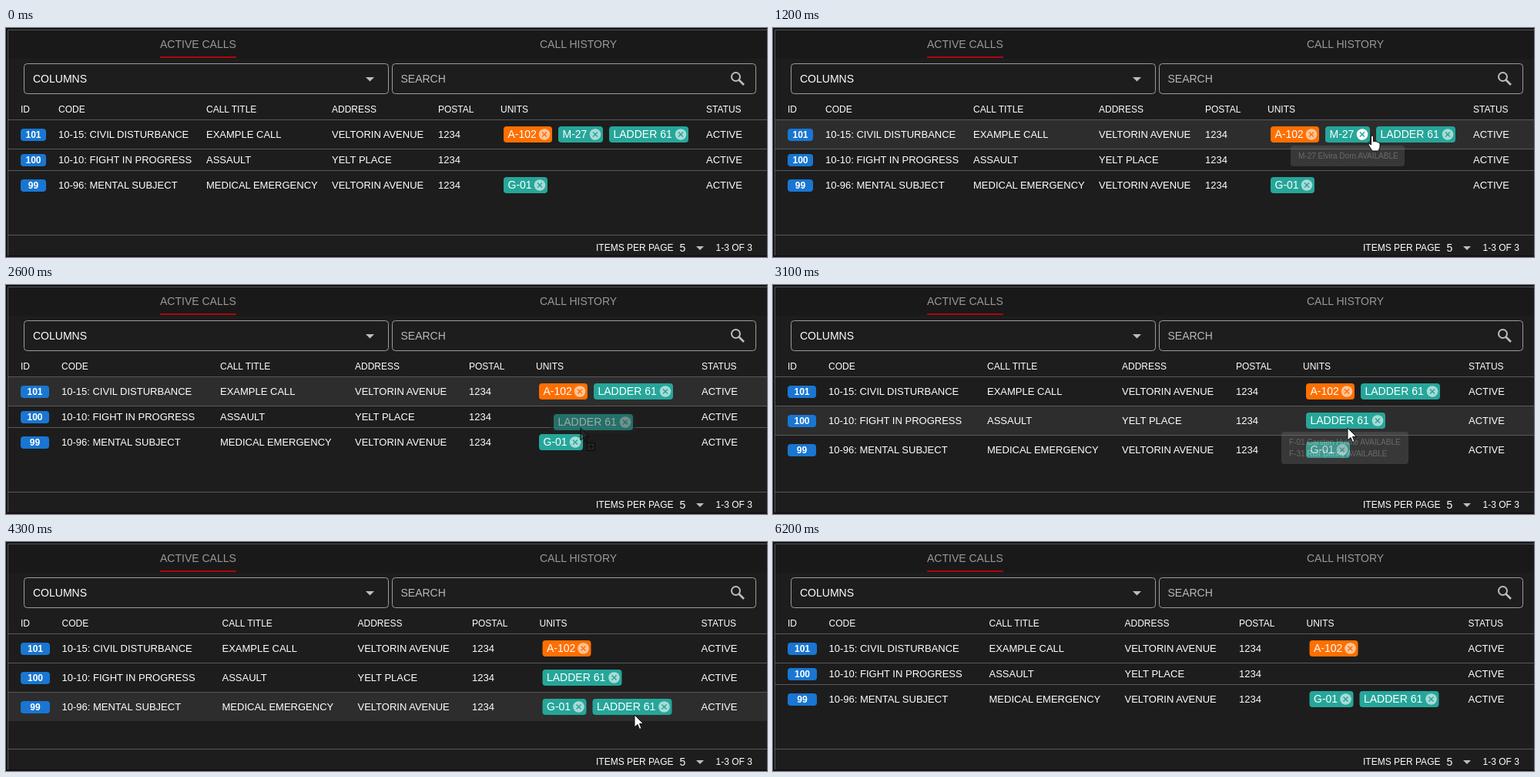
Write an HTML page that moves like this. It is 988 px wide and 298 px high and loops after 6300 ms.

```html
<!DOCTYPE html>
<html lang="en">
<head>
<meta charset="utf-8">
<title>Active calls</title>
<style>
  html, body { margin: 0; width: 100%; height: 100%; overflow: hidden; background: #111; }
  svg { display: block; width: 988px; height: 298px; }
  text { font: 13px "Liberation Sans", Arial, sans-serif; fill: #fff; white-space: pre; }
  .small { font-size: 12px; }
  .large { font-size: 14px; }
  .tip { font-size: 10px; }
  .badge { font-size: 12px; font-weight: bold; text-anchor: middle; }
  .muted { fill: #999; }
  .hint { fill: #b8b8b8; }
  .line { stroke: #595959; fill: none; }
  .field { stroke: #9c9c9c; fill: none; }
  .icon { fill: #bdbdbd; }
</style>
</head>
<body>
<svg viewBox="0 0 988 298">
  <path fill="#1d1d1d" d="M3 3H988V296H3Z"/>
  <path fill="#191919" d="M3 3H988V40H3Z"/>
  <path fill="#1a0d10" d="M0 296H988V298H0Z"/>
  <path class="line" d="M988 2.5H2.5V296M3 269.5H988"/>
  <text class="large muted" x="200" y="26">ACTIVE CALLS</text>
  <text class="large muted" x="693" y="26">CALL HISTORY</text>
  <path fill="#b0040f" d="M200 37H299V39H200Z"/>
  <rect class="field" x="23.5" y="46.5" width="473" height="39" rx="4"/>
  <rect class="field" x="501.5" y="46.5" width="472" height="39" rx="4"/>
  <text class="large" x="35" y="71">COLUMNS</text>
  <text class="large hint" x="512.5" y="71">SEARCH</text>
  <path class="icon" d="M467 64H478L472.5 69.5ZM896 284H906L901 289Z"/>
  <g fill="none" stroke="#bdbdbd" stroke-width="2">
    <circle cx="947.5" cy="63.5" r="5.5"/>
    <path d="M951.5 67.5L958 74" stroke-width="2.6"/>
  </g>
  <text class="small" x="766" y="290">ITEMS PER PAGE</text>
  <text class="large" x="874.5" y="291">5</text>
  <text class="small" x="921.5" y="290">1-3 OF 3</text>
  <g id="table"></g>
  <g id="overlay"></g>
</svg>
<script>
const LOOP = 6300, TICK = 100;
const tableLayer = document.getElementById('table');
const overlay = document.getElementById('overlay');

const HEADERS = ['CODE', 'CALL TITLE', 'ADDRESS', 'POSTAL', 'UNITS', 'STATUS'];
const CALLS = [
  ['101', '10-15: CIVIL DISTURBANCE', 'EXAMPLE CALL', 'VELTORIN AVENUE', '1234', '', 'ACTIVE'],
  ['100', '10-10: FIGHT IN PROGRESS', 'ASSAULT', 'YELT PLACE', '1234', '', 'ACTIVE'],
  ['99', '10-96: MENTAL SUBJECT', 'MEDICAL EMERGENCY', 'VELTORIN AVENUE', '1234', '', 'ACTIVE']
];
const UNITS = {
  A: { label: 'A-102', width: 63, color: '#ff6f00' },
  M: { label: 'M-27', width: 58, color: '#26a69a' },
  L: { label: 'LADDER 61', width: 103, color: '#26a69a' },
  G: { label: 'G-01', width: 57, color: '#26a69a' }
};

// Column positions; the table is re-fitted whenever the units change.
const WIDE = { badge: 33, cols: [68, 260, 423, 561, 642, 909] };
const MEDIUM = { badge: 37, cols: [72, 278, 453, 601, 688, 903] };
const NARROW = { badge: 42, cols: [77.5, 301, 491, 651.5, 746, 895] };
const FINAL = { badge: 38, cols: [72.5, 280.5, 456.5, 605, 692.5, 902.5] };

const STATES = [
  { at: 0, layout: WIDE, units: ['AML', '', 'G'] },
  { at: 1300, layout: MEDIUM, units: ['AL', '', 'G'] },
  { at: 2700, layout: MEDIUM, units: ['AL', 'L', 'G'] },
  { at: 3400, layout: NARROW, units: ['A', 'L', 'G'] },
  { at: 4200, layout: FINAL, units: ['A', 'L', 'GL'] },
  { at: 5200, layout: FINAL, units: ['A', '', 'GL'] }
];
const HOVERS = [
  { at: 0, row: -1 }, { at: 400, row: 2 }, { at: 500, row: 1 }, { at: 600, row: 0 },
  { at: 2700, row: 1 }, { at: 4200, row: 2 }, { at: 4500, row: -1 }
];
const TIPS = [
  { from: 700, to: 1000, x: 746, y: 163, width: 148, lines: ['M-27 Elvira Dorn AVAILABLE'] },
  ...[{ from: 1500, to: 2000, x: 814.5, y: 163 }, { from: 3000, to: 3300, x: 742.5, y: 201 }]
    .map(tip => ({ ...tip, width: 165, lines: ['F-01 Carsten Hulme AVAILABLE', 'F-31 Rolf Denny AVAILABLE'] }))
];
const DRAGS = [
  { from: 2200, to: 2700, dx: -35, dy: -18 },
  { from: 3600, to: 4200, dx: -48, dy: -14 }
];
// Pointer path: time, x, y
const PATH = [
  [100, 850, 292], [700, 780, 146], [1000, 766, 138], [1100, 768, 138], [1200, 778, 140],
  [1400, 798, 145], [2100, 798, 145], [2600, 746, 186], [3200, 746, 186],
  [3500, 798, 180], [3900, 811, 213], [4200, 812, 218], [4400, 820, 232], [4700, 838, 296]
];

const latest = (steps, t) => steps.filter(s => s.at <= t).pop();
const during = (s, t) => t >= s.from && t < s.to;
const clamp = v => Math.max(0, Math.min(1, v));
const text = (x, y, str, cls = '') => `<text class="${cls}" x="${x}" y="${y}">${str}</text>`;
const box = (x, y, w, h, fill, extra = '') =>
  `<rect x="${x}" y="${y}" width="${w}" height="${h}" rx="4" fill="${fill}" ${extra}/>`;

function chip(key, x, y, active) {
  const { label, width, color } = UNITS[key];
  const cx = x + width - 10, cy = y + 10.5;
  return box(x, y, width, 21, color) + text(x + 5.5, y + 15, label, 'large') +
    `<circle cx="${cx}" cy="${cy}" r="7.3" fill="#fff" opacity="${active ? 1 : 0.6}"/>` +
    `<path d="M${cx - 3} ${cy - 3}l6 6m0-6l-6 6" stroke="${color}" stroke-width="1.5"/>`;
}

function drawTable(t) {
  const { layout, units } = latest(STATES, t);
  const hover = latest(HOVERS, t).row;
  const closing = t >= 900 && t < 1300;
  let out = text(19, 110, 'ID', 'small') +
    HEADERS.map((h, i) => text(layout.cols[i], 110, h, 'small')).join('');
  let top = 119;
  CALLS.forEach(([id, ...cells], row) => {
    const height = units[row] ? 38 : 28, mid = top + height / 2;
    if (row === hover) out += `<path fill="#2d2d2d" d="M3 ${top}H988v${height}H3Z"/>`;
    out += `<path class="line" d="M3 ${top + 0.5}H988"/>`;
    out += box(19, mid - 7, layout.badge, 16, '#1976d2');
    out += text(19 + layout.badge / 2, mid + 5, id, 'badge');
    cells.forEach((cell, i) => { if (cell) out += text(layout.cols[i], mid + 5, cell); });
    let x = layout.cols[4] + 4;
    for (const key of units[row]) {
      out += chip(key, x, mid - 10, key === 'M' && closing);
      x += UNITS[key].width + 8;
    }
    top += height;
  });
  return out;
}

function drawTip(tip, t) {
  const shown = clamp((t - tip.from) / 300) * clamp(1 - (t - tip.to) / 300);
  if (!shown) return '';
  const left = tip.x - tip.width / 2, y = tip.y - 15 * (1 - shown);
  return `<g opacity="${shown}">` +
    box(left, y, tip.width, 12 + 15 * tip.lines.length, '#757575', 'fill-opacity=".94"') +
    tip.lines.map((line, i) => text(left + 10, y + 17 + 15 * i, line, 'tip')).join('') + '</g>';
}

function pointerAt(t) {
  const i = PATH.findIndex(([time]) => time > t);
  if (i < 1) return null;
  const [t0, x0, y0] = PATH[i - 1], [t1, x1, y1] = PATH[i];
  const k = (t - t0) / (t1 - t0);
  return [x0 + (x1 - x0) * k, y0 + (y1 - y0) * k];
}

const ARROW = 'M0 0V16L4 12.5L6.5 18.5L9 17.5L6.5 11.5H11.5Z';
const HAND = 'M-1.5 1Q0-1 1.5 1V8Q3 6 4.5 8Q6 7 7.5 9Q10 8 10 11V15L8 20H0L-5 12Q-5 9-1.5 12Z';

function drawPointer(t) {
  const pos = pointerAt(t);
  if (!pos) return '';
  const [x, y] = pos;
  const drag = DRAGS.find(d => during(d, t));
  const at = `<g transform="translate(${x} ${y})"`;
  if (drag) {
    const gx = x + drag.dx, gy = y + drag.dy;
    return box(gx - 4, gy - 1, 111, 25, '#222', 'opacity=".6"') +
      `<g opacity=".6">${chip('L', gx, gy)}</g>` +
      `${at} fill="#333" fill-opacity=".35" stroke="#080808"><path d="${ARROW}"/>` +
      `<path d="M8.5 19.5h10v10h-10ZM13.5 21.5v6M10.5 24.5h6"/></g>`;
  }
  const shape = t >= 900 && t < 1300 ? HAND : ARROW;
  return `${at} fill="#fff" stroke="#111"><path d="${shape}"/></g>`;
}

let lastTick = -1;
function frame(now) {
  const t = Math.floor((now % LOOP) / TICK) * TICK;
  if (t !== lastTick) {
    lastTick = t;
    tableLayer.innerHTML = drawTable(t);
    overlay.innerHTML = TIPS.map(tip => drawTip(tip, t)).join('') + drawPointer(t);
  }
  requestAnimationFrame(frame);
}
frame(performance.now());
</script>
</body>
</html>
```
